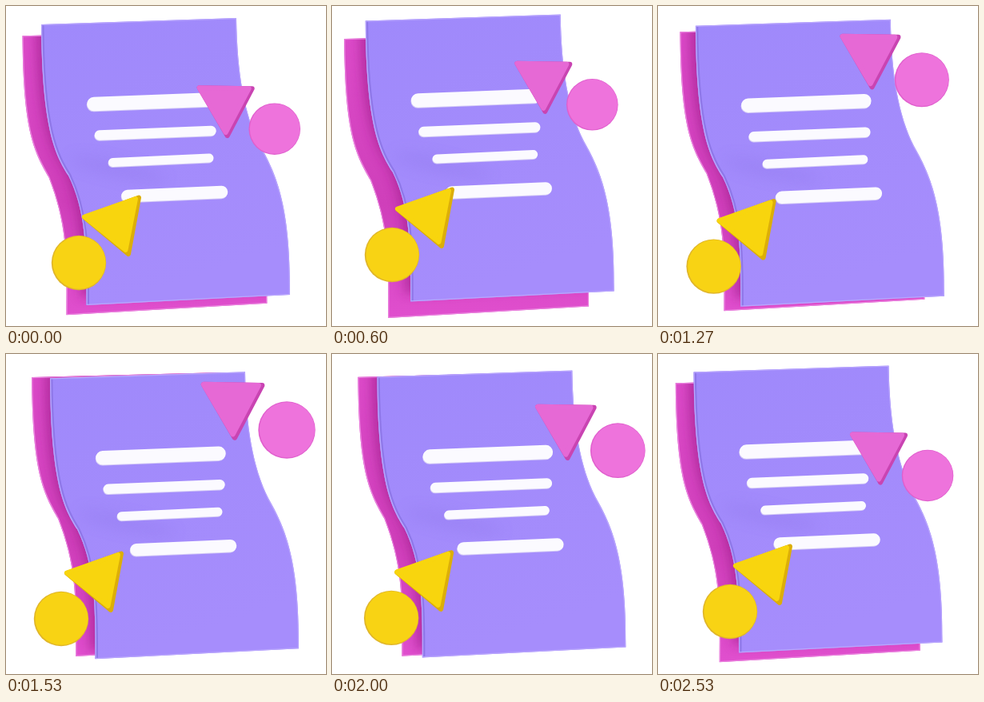
An HTML page that plays this animation: 400x400 px, repeating every 2.59 s.

```html
<!DOCTYPE html>
<html lang="en">
<head>
<meta charset="utf-8">
<title>Floating document</title>
<style>
  html, body { margin: 0; width: 100%; height: 100%; overflow: hidden; background: #fff; }
  svg { display: block; width: 100%; height: 100%; }
  .bars { fill: none; stroke-linecap: round; }
  .solid { stroke-width: 6; stroke-linejoin: round; }
</style>
</head>
<body>
<svg viewBox="0 0 400 400">
  <defs>
    <path id="sheet" d="M44 23L288 15C289 85 298 135 317 173C336 207 356 245 355 361L100.500 374C101 300 99 255 78 212C62 187 45 155 44 23Z"/>
    <path id="back" d="M21 38L262 32C264 120 280 160 300 205C322 250 327 290 327 372.500L76 387C77 310 76 272 54 215C36 183 22 160 21 38Z"/>
    <g id="bars">
      <path stroke-width="17.500" d="M110 122.500L255 117"/>
      <path stroke-width="12.500" d="M117 161.500L256.500 156"/>
      <path stroke-width="11" d="M133.500 195.500L254 190"/>
      <path stroke-width="15.500" d="M152 237.500L269.500 232.500"/>
    </g>
    <clipPath id="backClip"><use href="#back"/></clipPath>
    <clipPath id="sheetClip"><use href="#sheet"/></clipPath>
    <filter id="soft" x="-20%" y="-20%" width="140%" height="140%"><feGaussianBlur stdDeviation="7"/></filter>
    <filter id="blur" x="-50%" y="-100%" width="200%" height="300%"><feGaussianBlur stdDeviation="9"/></filter>
    <linearGradient id="violet" x1="0" y1="0" x2=".3" y2="1">
      <stop offset="0" stop-color="#9f89fb"/>
      <stop offset="1" stop-color="#a68dfc"/>
    </linearGradient>
    <linearGradient id="magenta" x1="0" y1="0" x2="0" y2="1">
      <stop offset="0" stop-color="#dc4bc9"/>
      <stop offset=".6" stop-color="#cf3fba"/>
      <stop offset="1" stop-color="#e04fce"/>
    </linearGradient>
  </defs>

  <g id="rear">
    <use href="#back" fill="url(#magenta)"/>
    <g clip-path="url(#backClip)">
      <use id="shade" href="#sheet" fill="#a3208f" opacity=".7" filter="url(#soft)"/>
      <use href="#back" fill="none" stroke="#ea83de" stroke-width="2.500"/>
    </g>
  </g>

  <g id="front">
    <use href="#sheet" fill="url(#violet)"/>
    <g clip-path="url(#sheetClip)">
      <ellipse cx="140" cy="204" rx="62" ry="9" transform="rotate(12 140 204)" fill="#8b72ea" opacity=".3" filter="url(#blur)"/>
      <path d="M100.500 374C101 300 99 255 78 212C62 187 45 155 44 23" fill="none" stroke="#8e78e9" stroke-width="7"/>
      <use href="#sheet" fill="none" stroke="#b9a6fd" stroke-width="2.500"/>
    </g>
    <use href="#bars" class="bars" stroke="#d6cdf6" x="-.500" y="1"/>
    <use href="#bars" class="bars" stroke="#fbfaff"/>
  </g>

  <g id="pink">
    <path class="solid" fill="#c944b2" stroke="#c944b2" d="M-94-51.500L-28-50.500L-59 8.500Z"/>
    <path class="solid" fill="#e669d5" stroke="#e669d5" d="M-94-51.500L-32-50.500L-61 4.500Z"/>
    <circle r="32.300" fill="#e05fcd"/>
    <circle cx=".4" cy="-.2" r="31.300" fill="#ee73dc"/>
  </g>

  <g id="yellow">
    <path class="solid" fill="#dcae08" stroke="#dcae08" d="M7-57L75-81.500L62-11Z"/>
    <path class="solid" fill="#f8d50e" stroke="#f8d50e" d="M7-57.500L71-80L58.500-16Z"/>
    <circle r="34.200" fill="#e0b62a"/>
    <circle cx=".5" cy="-.3" r="33" fill="#f8d314"/>
  </g>
</svg>
<script>
const LOOP = 2590, FPS = 15, FRAMES = 39;
const $ = id => document.getElementById(id);

// Keys are [time, x, y, scale].
const frontKeys = [[0, 0, 0], [600, -2.3, -4.5], [1000, -2, -2.5], [1530, 11, 7.3],
  [1800, 20.5, 13.4], [2130, 6, 0], [2270, 3, -2], [2530, .5, -.4]];
const pinkKeys = [[0, 335.7, 153.7, 1], [600, 325.3, 123.3, 1], [1000, 315, 91, 1],
  [1530, 351, 95, 1.105], [1800, 363.5, 107, 1.105], [2270, 343.5, 140, 1], [2530, 337, 152, 1]];
const yellowKeys = [[0, 91, 321], [600, 75, 311], [1000, 71, 318], [1530, 69, 331],
  [1800, 70, 332], [2270, 83, 325], [2530, 90, 322]];

// Looping cubic curve that eases at every turning point.
function curve(keys, t, c) {
  const n = keys.length;
  const at = i => {
    const turn = Math.floor(i / n), k = keys[i - turn * n];
    return [k[0] + turn * LOOP, k[c]];
  };
  const slope = i => {
    const [t0, a] = at(i), [t1, b] = at(i + 1);
    return (b - a) / (t1 - t0);
  };
  const tangent = i => {
    const a = slope(i - 1), b = slope(i);
    return a * b > 0 ? 2 * a * b / (a + b) : 0;
  };
  let i = n - 1;
  while (keys[i][0] > t) i--;
  const [t0, a] = at(i), [t1, b] = at(i + 1), h = t1 - t0, u = (t - t0) / h, v = 1 - u;
  return v * v * (1 + 2 * u) * a + u * u * (3 - 2 * u) * b
    + h * u * v * (v * tangent(i) - u * tangent(i + 1));
}

const move = (id, x, y, s = 1) =>
  $(id).setAttribute('transform', `translate(${x.toFixed(2)} ${y.toFixed(2)}) scale(${s.toFixed(4)})`);

function draw(now) {
  const frame = Math.min(FRAMES - 1, Math.floor((now % LOOP + 4) * FPS / 1000));
  const t = Math.round(frame * 100 / FPS) * 10;

  const swing = Math.cos(2 * Math.PI * (t - 480) / LOOP);
  const rx = 3.2 - 9.5 * swing, ry = -3.4 + 6.7 * swing;
  const fx = curve(frontKeys, t, 1), fy = curve(frontKeys, t, 2);

  move('rear', rx, ry);
  move('shade', fx - rx - 7, fy - ry - 10);
  move('front', fx, fy);
  move('pink', curve(pinkKeys, t, 1), curve(pinkKeys, t, 2), curve(pinkKeys, t, 3));
  move('yellow', curve(yellowKeys, t, 1), curve(yellowKeys, t, 2));
}

let start;
function tick(now) {
  start ??= now;
  draw(now - start);
  requestAnimationFrame(tick);
}
draw(0);
requestAnimationFrame(tick);
</script>
</body>
</html>
```
